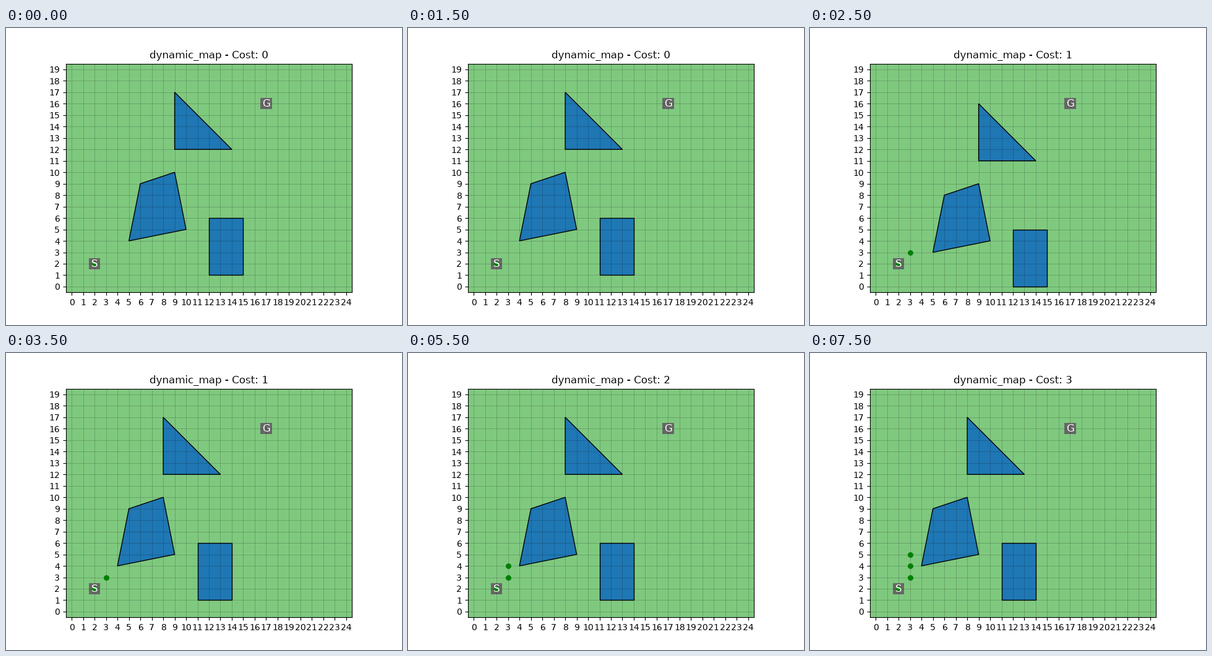
These frames come from a looping animation (640 px wide and 480 px high, 8000 ms). A matplotlib script:

```python
import numpy as np
import matplotlib.pyplot as plt
from matplotlib.animation import FuncAnimation

# a factor of 9 keeps 10 pt and 12 pt glyph widths unrounded at 100 dpi
plt.rcParams.update({"text.hinting": "default", "text.hinting_factor": 9})

COLS, ROWS = 25, 20
STEP_MS, MOVES, STEPS_PER_MOVE = 500, 4, 4
START, GOAL = (2, 2), (17, 16)


def box(x, y, w, h):
    return [(x, y), (x + w, y), (x + w, y + h), (x, y + h)]


SHAPES = [
    np.array([(9, 12), (14, 12), (9, 17)]),
    np.array([(5, 4), (10, 5), (9, 10), (6, 9)]),
    np.array(box(12, 1, 3, 5)),
]


def drift(step):
    """Obstacles circle a unit square: home, down, left, up."""
    phase = step % 4
    return -(phase // 2), -((phase + 1) // 2 % 2)


def robot(move):
    """One diagonal move from the start, then straight up."""
    return START[0] + min(move, 1), START[1] + move


fig, ax = plt.subplots(figsize=(6.4, 4.8), dpi=100)
cells = np.zeros((ROWS, COLS))
for (x, y), name in ((START, "S"), (GOAL, "G")):
    cells[y, x] = 1
    ax.text(x, y, name, color="white", fontsize=12, ha="center", va="center")
ax.imshow(cells, cmap="Accent", origin="lower", interpolation="nearest")
ax.set_xticks(range(COLS))
ax.set_yticks(range(ROWS))
ax.grid(color="black", alpha=0.25, linewidth=0.5)
title = ax.set_title("")

obstacles = [ax.add_patch(plt.Polygon(s, facecolor="C0", edgecolor="black"))
             for s in SHAPES]
# the robot's cell is marked again on every step, hardening the dot's edge
marks = [ax.plot(*robot(step // STEPS_PER_MOVE), "o", color="green",
                 markersize=5)[0]
         for step in range(MOVES * STEPS_PER_MOVE)]


def update(step):
    for patch, shape in zip(obstacles, SHAPES):
        patch.set_xy(shape + drift(step))
    for i, dot in enumerate(marks):
        dot.set_visible(i <= step)
    title.set_text(f"dynamic_map - Cost: {step // STEPS_PER_MOVE}")
    return [*obstacles, *marks, title]


anim = FuncAnimation(fig, update, frames=MOVES * STEPS_PER_MOVE,
                     interval=STEP_MS, repeat=True, repeat_delay=0)
plt.show()
```
